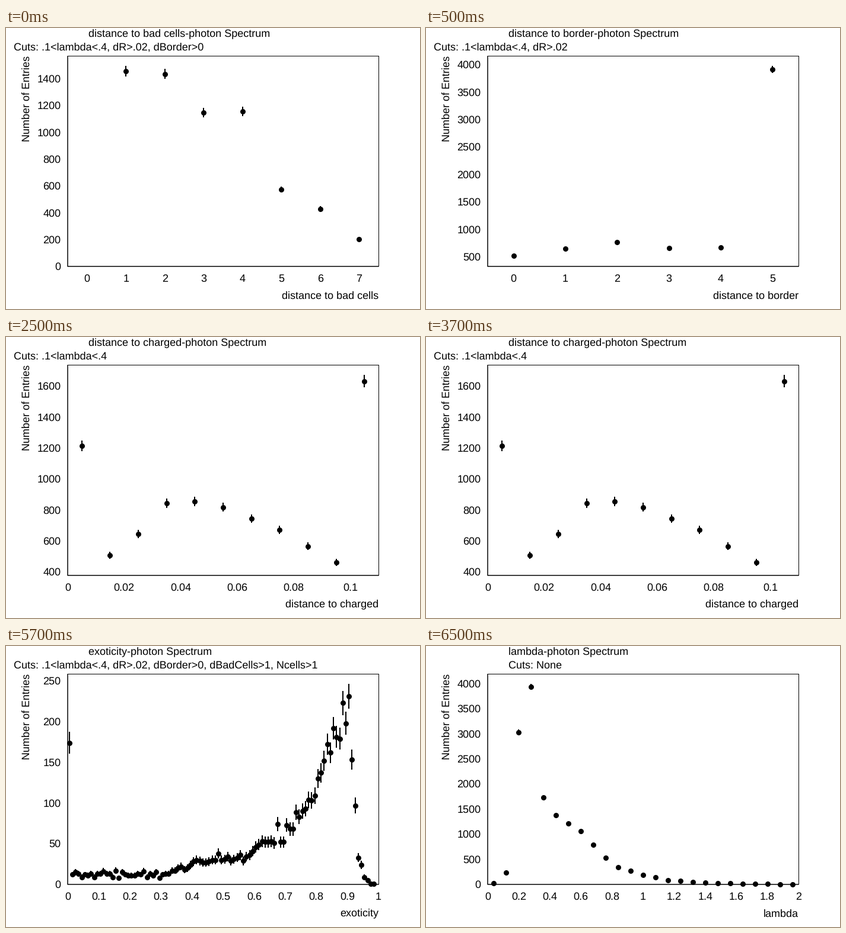
These frames come from a looping animation (698 by 475 pixels, 8000 ms). A matplotlib script:

```python
import matplotlib.pyplot as plt
import numpy as np
from matplotlib.animation import FuncAnimation

W, H, DPI = 698, 475, 100
PX = 72 / DPI  # points per pixel
LEFT, RIGHT, TOP, BOTTOM = 104, 628, 47, 403
STEP_MS = 500

plt.rcParams.update({
    "font.family": "Liberation Sans",
    "font.size": 18 * PX,
    "text.hinting": "none",
    "toolbar": "None",
})

# shape: key points (bin, count) joined by straight lines; scatter: noise in sigmas between them
PLOTS = [
    dict(name="distance to bad cells", cuts=".1<lambda<.4, dR>.02, dBorder>0",
         shape=[(0, 0), (1, 1458), (2, 1436), (3, 1148), (4, 1157), (5, 574), (6, 428), (7, 203)],
         bin_width=1, xlim=(-0.5, 7.5), xticks=range(8),
         ylim=(0, 1572.2), yticks=range(0, 1401, 200), steps=1),
    dict(name="distance to border", cuts=".1<lambda<.4, dR>.02",
         shape=[(0, 522), (2, 769), (3, 662), (4, 672), (5, 3914)],
         bin_width=1, xlim=(-0.5, 5.5), xticks=range(6),
         ylim=(327.7, 4161.5), yticks=range(500, 4001, 500), steps=4),
    dict(name="distance to charged", cuts=".1<lambda<.4",
         shape=[(0, 1214), (1, 507), (2, 645), (3, 843), (4, 855), (5, 817), (7, 671),
                (9, 461), (10, 1631)],
         bin_width=0.01, xlim=(0, 0.11), xticks=np.arange(6) * 0.02,
         ylim=(377.1, 1737.6), yticks=range(400, 1601, 200), steps=4),
    dict(name="exoticity", cuts=".1<lambda<.4, dR>.02, dBorder>0, dBadCells>1, Ncells>1",
         shape=[(0, 174), (1, 12), (32, 13), (42, 29), (57, 34), (63, 52), (66, 51), (67, 74),
                (68, 52), (75, 90), (80, 130), (84, 162), (85, 192), (87, 179), (88, 223),
                (89, 198), (90, 231), (91, 153), (92, 97), (93, 33), (95, 9), (97, 1), (98, 1)],
         scatter=0.6,
         bin_width=0.01, xlim=(0, 1), xticks=np.arange(11) * 0.1,
         ylim=(0, 258.7), yticks=range(0, 251, 50), steps=4),
    dict(name="lambda", cuts="None",
         shape=[(0, 24), (1, 236), (2, 3027), (3, 3934), (4, 1731), (5, 1378), (7, 1060),
                (9, 530), (10, 345), (12, 190), (14, 85), (17, 36), (20, 12), (24, 3)],
         bin_width=0.08, xlim=(0, 2), xticks=np.arange(11) * 0.2,
         ylim=(0, 4194), yticks=range(0, 4001, 500), steps=3),
]
SCHEDULE = [plot for plot in PLOTS for _ in range(plot["steps"])]

fig = plt.figure(figsize=(W / DPI, H / DPI), dpi=DPI, facecolor="white")
ax = fig.add_axes([0, 0, 1, 1])


def rescale(values, limits, start, end):
    lo, hi = limits
    return start + (np.asarray(values, float) - lo) / (hi - lo) * (end - start)


def bin_counts(plot):
    keys, heights = zip(*plot["shape"])
    bins = np.arange(keys[-1] + 1)
    counts = np.interp(bins, keys, heights)
    noise = np.random.default_rng(4).normal(0, plot.get("scatter", 0), len(bins))
    noise[list(keys)] = 0
    return np.round(counts + noise * np.sqrt(counts))


def label(x, y, text, ha="left", **style):
    ax.text(x, y, text, ha=ha, va="baseline", color="black", **style)


def line(xs, ys, width):
    ax.plot(xs, ys, color="black", lw=width * PX, solid_capstyle="butt")


def draw_axes(plot):
    line([LEFT, RIGHT, RIGHT], [TOP, TOP, BOTTOM], 1)
    line([LEFT, LEFT, RIGHT], [TOP, BOTTOM, BOTTOM], 1.5)
    for tick, x in zip(plot["xticks"], rescale(plot["xticks"], plot["xlim"], LEFT, RIGHT)):
        label(x, 429, f"{tick:g}", "center")
    for tick, y in zip(plot["yticks"], rescale(plot["yticks"], plot["ylim"], BOTTOM, TOP)):
        label(92.5, y + 6, f"{tick:g}", "right")


def draw_titles(plot):
    name, cuts = plot["name"], plot["cuts"]
    label(139, 14, f"{name}-photon Spectrum")
    label(139 if cuts == "None" else 13, 38, f"Cuts: {cuts}")
    label(40, TOP, "Number of Entries", "right", rotation=90, rotation_mode="anchor")
    # the axis name is aligned by its lowest ink
    has_descender = any(c in "gjpqy" for c in name)
    label(RIGHT, 456 if has_descender else 458, name, "right")


def draw_points(plot):
    counts = bin_counts(plot)
    centres = plot["xlim"][0] + (np.arange(len(counts)) + 0.5) * plot["bin_width"]
    filled = counts > 0
    x = rescale(centres, plot["xlim"], LEFT, RIGHT)[filled]
    counts = counts[filled]
    error = np.sqrt(counts)
    y, low, high = (rescale(v, plot["ylim"], BOTTOM, TOP)
                    for v in (counts, counts - error, counts + error))
    ax.vlines(x, low, high, color="black", lw=2 * PX)
    ax.plot(x, y, "o", color="black", ms=9 * PX, mew=0)


def update(step):
    plot = SCHEDULE[step % len(SCHEDULE)]
    ax.clear()
    ax.axis("off")
    draw_axes(plot)
    draw_titles(plot)
    draw_points(plot)
    # one unit per pixel, y pointing down
    ax.set_xlim(0, W)
    ax.set_ylim(H, 0)
    return ax.get_children()


anim = FuncAnimation(fig, update, frames=len(SCHEDULE), init_func=lambda: update(0),
                     interval=STEP_MS, repeat=True, repeat_delay=0, blit=False)
plt.show()
```
